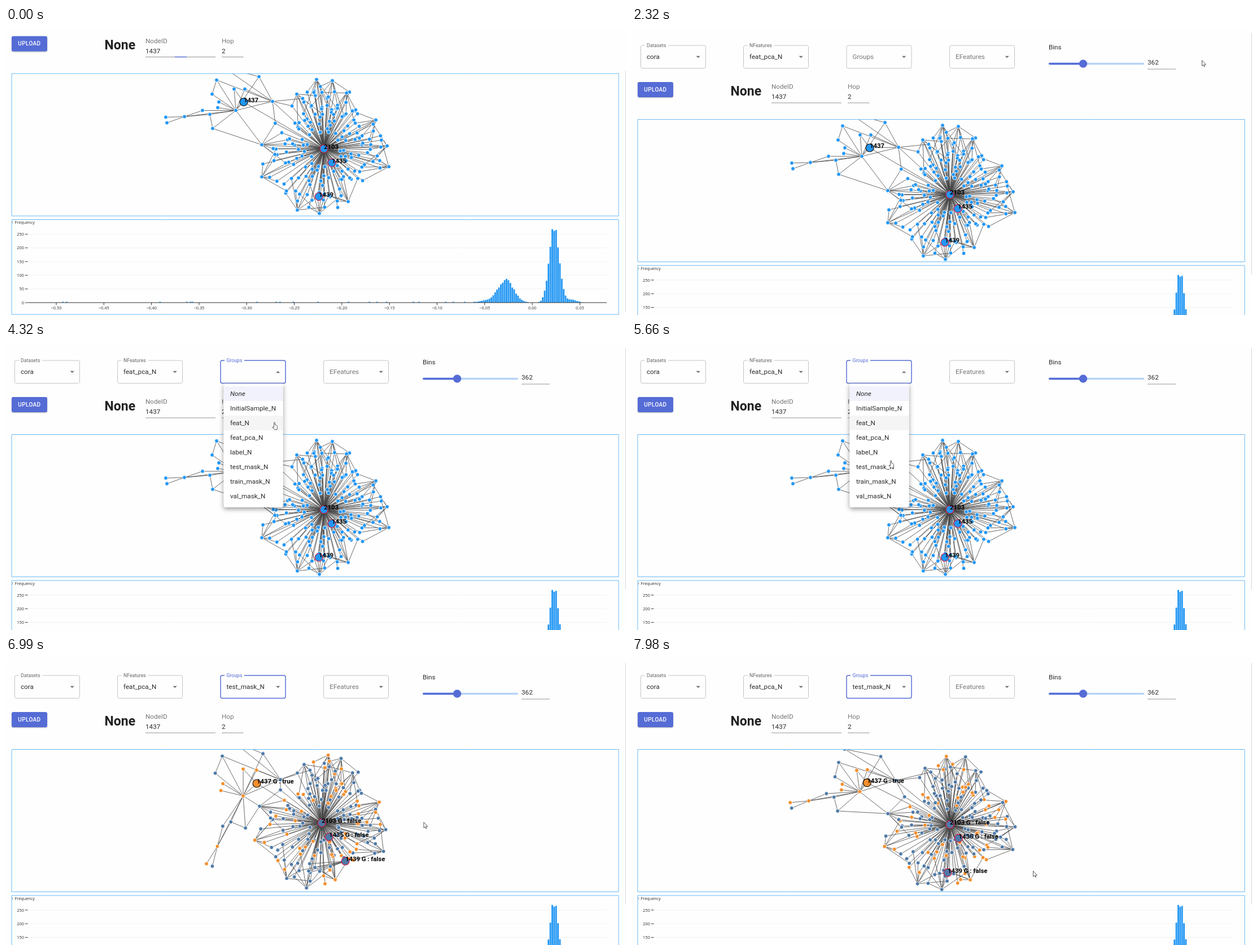
Animation, 1098 px wide and 510 px high, one loop 8000 ms. Source, as an HTML page with a canvas:

```html
<!DOCTYPE html>
<html lang="en">
<head>
<meta charset="utf-8">
<title>Graph explorer</title>
<style>
html, body { margin: 0; width: 100%; height: 100%; overflow: hidden; background: #fefefe; }
canvas { display: block; }
</style>
</head>
<body>
<canvas id="stage" width="1098" height="510"></canvas>
<script>
const ctx = document.getElementById('stage').getContext('2d');
const PAPER = '#fefefe', PRIMARY = '#556cd6', BLUE = '#2196f3', GREY = '#757575';
const INK = '#2a2a2a', RULE = '#949494', FRAME = '#6abbf7';

const LOOP = 8000, RATE = 3, LEAD = 21;
const SCROLLED = 7, HOVERED = 9, OPENED = 11, CHOSEN = 19, MIDDLE = 21, END = 24;
const SCROLL = 81.5;

// Pointer path: step, x, y; straight in between
const path = [
  [0, 1110, 510], [1, 1068, 410], [2, 1110, 350], [3, 1091, 289], [4, 994, 247], [5, 1026, 100],
  [6, 1009, 52], [7, 1009, 57], [8, 300, 81], [9, 448, 52], [10, 448, 52], [11, 449, 163],
  [12, 460, 172], [13, 471, 140], [14, 466, 111], [15, 466, 111], [16, 475, 131],
  [17, 454, 208], [18, 469, 215], [19, 600, 206], [20, 740, 262], [23, 738, 350], [24, 710, 378]
];
const arrow = new Path2D('M0 0V10L2.3 8 3.8 11.3 5.2 10.6 3.8 7.5H7Z');
const hand = new Path2D('M3 8V1.5a1 1 0 0 1 2 0V5l3 1q1 .5 1 2l-.5 5.5H4L.6 9.5q-.3-2 2.4 0z');

let seed = 7;
function rand() {
  seed = (seed * 16807) % 2147483647;
  return seed / 2147483647;
}
const mix = (a, b, k) => a + (b - a) * k;

// ---- graph: each node has four poses: rest, start, middle, end ----
const nodes = [], links = [];
const join = (a, list) => list.forEach(b => links.push([a, b]));

function add(pose, orange, name) {
  const node = { pose, orange, name };
  nodes.push(node);
  return node;
}
function swing([cx, cy], [dx, dy], turn, scale = 1) {
  const c = Math.cos(turn) * scale, s = Math.sin(turn) * scale;
  return [cx + dx * c - dy * s, cy + dx * s + dy * c];
}
const CENTRE = [563, 296], DRIFT = -.06;
function key(rest, start, middle, orange, name) {
  const end = swing(CENTRE, [rest[0] - CENTRE[0], rest[1] - CENTRE[1]], DRIFT);
  return add([rest, start, middle, end], orange, name);
}
// A node that swings around another one from pose to pose
function orbit(core, offset, { turn, scale, loose = 0 }, orange) {
  return add(core.pose.map((c, p) =>
    swing(c, offset, turn[p], scale[p]).map(v => v + (p ? (rand() - .5) * loose : 0))), orange);
}

const hub = key(CENTRE, [547, 293], [559, 293], false, '2103');
const near = key([577, 321], [557, 333], [572, 318], false, '1435');
const low = key([554, 381], [633, 327], [601, 361], false, '1439');
const picked = key([421, 213], [557, 266], [444, 223], true, '1437');
const anchor = key([407, 228], [458, 264], [420, 245], true);
const bridge = key([472, 212], [617, 231], [486, 216]);
const outer = key([448, 168], [643, 217], [455, 170]);

const headMove = { turn: [0, .6, .08, DRIFT], scale: [1, 1.4, 1.25, 1] };
const head = [[-34, -54], [-42, -29], [-3, -38], [16, -38], [-30, -15], [-32, -5], [-22, -77]]
  .map((at, i) => orbit(anchor, at, headMove, i > 1 && i < 6));
const tailMove = { turn: [0, -2.09, -.98, DRIFT], scale: [1, 2.1, 1.1, 1] };
const tail = [[-46, 7], [-41, 32], [-59, 0], [-91, 11], [-124, 12], [-122, 22]]
  .map((at, i) => orbit(anchor, at, tailMove, i === 3 || i === 4));

// Cloud: tips on the rim, leaves between each tip and the hub, and a dense core
const cloudMove = { turn: [0, .25, .18, .08], scale: [1, .95, 1, 1], loose: 8 };
const polar = (r, a) => [r * Math.cos(a), r * Math.sin(a)];
const tips = [], leaves = [];
[[-13, -123], [15, -121], [40, -99], [92, -51], [112, -5], [115, 32], [43, 94], [-8, 115],
 [-47, 109], [-110, 50], [-110, -7], [-48, -97]].forEach(([x, y], i) => {
  const tip = orbit(hub, [x, y], cloudMove, i % 3 === 0);
  const reach = Math.hypot(x, y), angle = Math.atan2(y, x);
  for (let n = 0; n < 8; n++) {
    const at = polar(reach * mix(.55, .94, rand()), angle + (n - 3.5) * .12);
    const leaf = orbit(hub, at, cloudMove, rand() < .38);
    leaves.push(leaf);
    if (n !== 1) join(tip, [leaf]);
  }
  tips.push(tip);
});
const core = Array.from({ length: 72 }, (_, i) =>
  orbit(hub, polar(25 + i * .6 + rand() * 5, i * 2.4 + rand() * .3), cloudMove,
    i > 14 && rand() < .36));

const gap = (a, b) => Math.hypot(a.pose[0][0] - b.pose[0][0], a.pose[0][1] - b.pose[0][1]);
const closest = (n, count) => [...leaves].sort((a, b) => gap(n, a) - gap(n, b)).slice(0, count);
join(hub, [...tips, ...leaves, ...core, near, low, bridge, picked]);
join(anchor, [...head.slice(0, 6), ...tail.slice(0, 4), bridge, outer, picked, tips[10]]);
join(bridge, [head[0], head[3], head[6], outer, picked, ...closest(bridge, 3)]);
join(tail[3], [tail[0], tail[2], tail[4], tail[5]]);
join(tail[1], [tail[0], tips[10]]);
join(head[0], [head[1]]);
join(outer, [head[6]]);
join(picked, [head[2]]);
join(low, closest(low, 6));
join(near, closest(near, 3));

// ---- drawing helpers ----
function text(str, x, y, px, color = INK, weight = '400', family = 'Roboto') {
  ctx.font = `${weight} ${px}px ${family}, sans-serif`;
  ctx.fillStyle = color;
  ctx.fillText(str, x, y + px * .36);
}
function line(x1, y1, x2, y2, color, width = 1) {
  ctx.strokeStyle = color;
  ctx.lineWidth = width;
  ctx.beginPath();
  ctx.moveTo(x1, y1);
  ctx.lineTo(x2, y2);
  ctx.stroke();
}
function paint(fill, stroke, width = 1) {
  if (fill) { ctx.fillStyle = fill; ctx.fill(); }
  if (stroke) { ctx.strokeStyle = stroke; ctx.lineWidth = width; ctx.stroke(); }
}
function box(x, y, w, h, r, fill, stroke, width) {
  ctx.beginPath();
  ctx.roundRect(x, y, w, h, r);
  paint(fill, stroke, width);
}
function disc(x, y, r, fill, stroke, width) {
  ctx.beginPath();
  ctx.arc(x, y, r, 0, 7);
  paint(fill, stroke, width);
}
function shadow(blur, dy, alpha) {
  ctx.shadowColor = `rgba(0,0,0,${alpha})`;
  ctx.shadowBlur = blur;
  ctx.shadowOffsetY = dy;
}

// ---- page parts ----
function select(x, label, value, border = '#c4c4c4', focused, open) {
  box(x, 31, 115, 40.5, 3, null, border, focused ? 1.45 : 1);
  if (value || focused) {
    ctx.font = '400 8.7px Roboto, sans-serif';
    ctx.fillStyle = PAPER;
    ctx.fillRect(x + 7, 29, ctx.measureText(label).width + 7, 5);
    text(label, x + 10.5, 31, 8.7, focused ? PRIMARY : '#666');
  }
  if (value) text(value, x + 10.5, 51, 11.7);
  else if (!focused) text(label, x + 10.5, 51, 11.7, GREY);
  const d = open ? -1.8 : 1.8;
  ctx.beginPath();
  ctx.moveTo(x + 98, 51.5 - d);
  ctx.lineTo(x + 105.4, 51.5 - d);
  ctx.lineTo(x + 101.7, 51.5 + d);
  paint(GREY);
}

function field(label, value, x, width) {
  text(label, x, 104, 11.7, GREY);
  text(value, x, 122, 11.7);
  line(x, 133, x + width, 133, RULE);
}

function controls(step) {
  const open = step >= OPENED && step < CHOSEN, chosen = step >= CHOSEN;
  const border = open || chosen ? PRIMARY : step >= HOVERED ? '#222' : undefined;
  select(15.5, 'Datasets', 'cora');
  select(197.5, 'NFeatures', 'feat_pca_N');
  select(380, 'Groups', chosen && 'test_mask_N', border, open || chosen, open);
  select(562.5, 'EFeatures');

  text('Bins', 738, 34, 11.7);
  box(738, 61.7, 169, 3.6, 1.8, '#b5d3f6');
  box(738, 61.7, 61, 3.6, 1.8, PRIMARY);
  disc(799, 63.5, 7.2, PRIMARY);
  text('362', 913, 61, 11.7);
  line(913, 73, 963, 73, RULE);

  shadow(2, 1, .3);
  box(10, 96, 63, 27, 3, PRIMARY);
  shadow(0, 0, 0);
  ctx.letterSpacing = '0.3px';
  text('UPLOAD', 21.3, 109, 10.1, '#fff', '500');
  ctx.letterSpacing = '0px';
  text('None', 174.5, 111.5, 23, '#222', '700');

  field('NodeID', '1437', 247, 124);
  field('Hop', '2', 382, 38.5);
  if (step === 0) line(299, 133, 320, 133, PRIMARY, 1.5);
}

function place(from, to, k) {
  for (const n of nodes) {
    n.x = mix(n.pose[from][0], n.pose[to][0], k);
    n.y = mix(n.pose[from][1], n.pose[to][1], k);
  }
}

function graph(step) {
  const grouped = step >= CHOSEN;
  if (!grouped) place(0, 0, 0);
  else if (step < MIDDLE) place(1, 2, (step - CHOSEN) / (MIDDLE - CHOSEN));
  else place(2, 3, 1 - (1 - (step - MIDDLE) / (END - MIDDLE)) ** 3);

  ctx.save();
  ctx.beginPath();
  ctx.rect(10, 162.5, 1075, 253);
  ctx.clip();
  links.forEach(([a, b]) => line(a.x, a.y, b.x, b.y, '#444', .8));
  const color = n => !grouped ? BLUE : n.orange ? '#f28e2c' : '#4e79a7';
  const named = nodes.filter(n => n.name);
  nodes.forEach(n => { if (!n.name) disc(n.x, n.y, 3.4, color(n), '#fff', .9); });
  named.forEach(n => disc(n.x, n.y, 7, color(n), n === picked ? '#111' : '#dc143c', 1.2));
  named.forEach(n => text(n.name + (grouped ? ` G : ${!!n.orange}` : ''),
    n.x, n.y - 3.6, 11.3, '#000', '700'));
  ctx.restore();
  box(10, 162.5, 1075, 253, 0, null, FRAME);
}

// Two humps, their tails and a few single counts far out
const bell = (i, mid, spread) => Math.exp(-((i - mid) ** 2) / (2 * spread ** 2));
const bars = [];
for (let i = -262; i < 28; i++) {
  const humps = 133 * bell(i, 0, 2.6) + 5 * bell(i, 9, 3) + 40 * bell(i, -25.5, 4.2) +
    3 * bell(i, -37, 3);
  const stray = rand() < .08 ? 1.5 : 0;
  bars.push({ x: 970.8 + i * 3.372, h: Math.max(humps * mix(.93, 1.07, rand()), stray) });
}

function histogram() {
  const base = 569.5, family = '"Open Sans"';
  box(10, 422, 1075, 168.5, 0, null, FRAME);
  text('↑ Frequency', 10, 427, 7.3, INK, '400', family);
  ctx.textAlign = 'right';
  for (let v = 0; v <= 250; v += 50) {
    const y = base - v * .4865;
    line(39, y, 1064, y, '#f2f2f2');
    line(34, y, 38.5, y, '#333');
    text(String(v), 32, y, 7.4, INK, '400', family);
  }
  ctx.fillStyle = BLUE;
  bars.forEach(({ x, h }) => { if (h > .8) ctx.fillRect(x - 1.4, base - h, 2.8, h); });
  line(39, base, 1064, base, '#333');
  ctx.textAlign = 'center';
  for (let i = -10; i <= 1; i++) {
    const x = 932 + i * 84.3;
    line(x, base, x, base + 4.5, '#333');
    text((i < 0 ? '−' : '') + Math.abs(i * .05).toFixed(2), x, base + 9, 7.4, INK, '400', family);
  }
  ctx.textAlign = 'left';
}

const items = ['None', 'InitialSample_N', 'feat_N', 'feat_pca_N', 'label_N',
  'test_mask_N', 'train_mask_N', 'val_mask_N'];
function menu() {
  shadow(8, 3, .4);
  box(385.5, 72, 105, 220, 3, '#fff');
  shadow(0, 0, 0);
  items.forEach((name, i) => {
    const y = 90 + i * 26;
    ctx.fillStyle = i === 0 ? '#f1f2fb' : i === 2 ? '#f5f5f5' : '#fff';
    ctx.fillRect(385.5, y - 13, 105, 26);
    text(name, 397, y, 11.7, INK, i ? '400' : 'italic 400');
  });
}

function pointer(step) {
  const next = path.findIndex(p => p[0] >= step);
  const b = path[next], a = path[Math.max(0, next - 1)];
  const k = next ? (step - a[0]) / (b[0] - a[0]) : 0;
  const shape = step >= HOVERED && step < CHOSEN ? hand : arrow;
  ctx.save();
  ctx.translate(mix(a[1], b[1], k) + .5, mix(a[2], b[2], k) + .5);
  ctx.fillStyle = '#fff';
  ctx.strokeStyle = '#333';
  ctx.lineWidth = .8;
  ctx.fill(shape);
  ctx.stroke(shape);
  ctx.restore();
}

function draw(now) {
  const step = Math.floor((now % LOOP + LEAD) * RATE / 1000);
  const down = step < SCROLLED;
  ctx.fillStyle = PAPER;
  ctx.fillRect(0, 0, 1098, 510);
  ctx.save();
  if (down) ctx.translate(0, -SCROLL);
  controls(step);
  graph(step);
  histogram();
  if (step >= OPENED && step < CHOSEN) menu();
  ctx.restore();
  ctx.fillStyle = '#d4d6da';
  ctx.fillRect(1097, down ? 76 : 9, 1, 429);
  pointer(step);
}

function loop() {
  draw(performance.now());
  requestAnimationFrame(loop);
}
loop();
</script>
</body>
</html>
```
